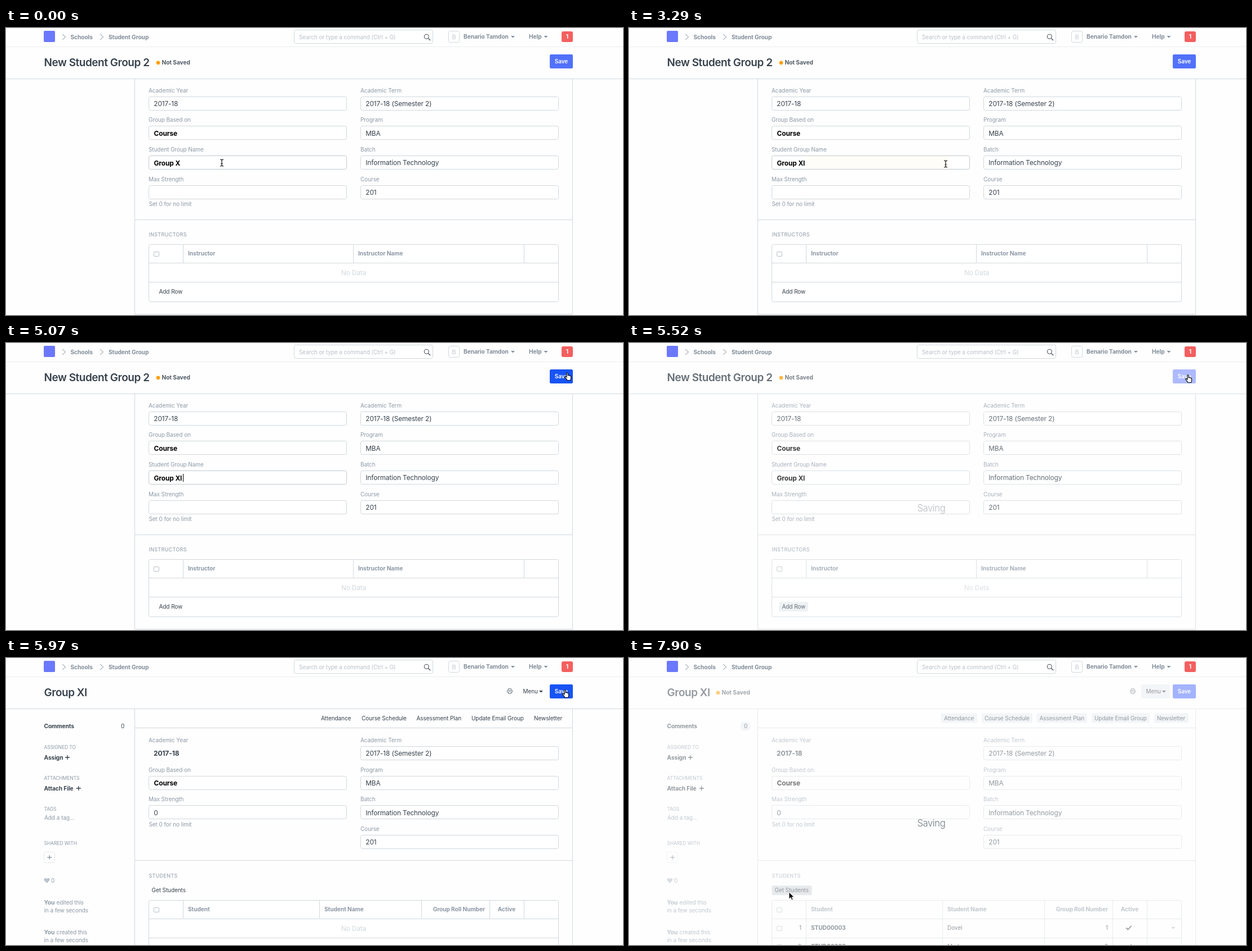
Recreate the animation shown at these times as an HTML page. Size 1095 px wide and 511 px high, loop 8000 ms.

```html
<!DOCTYPE html>
<html lang="en">
<head>
<meta charset="utf-8">
<title>Student group form</title>
<style>
  html, body { margin: 0; width: 100%; height: 100%; overflow: hidden; background: #fefefe; }
  svg { display: block; font-family: Inter, Roboto, sans-serif; }
  text { white-space: pre; }
</style>
</head>
<body>
<svg id="stage" width="1095" height="511" viewBox="0 0 1095 511"></svg>
<script>
const LOOP = 8000;
const INK = '#36414c', GRAY = '#8d99a6', LINE = '#d1d8dd', PALE = '#d1d8dd', SOFT = '#e9eef2';
const NAV = '#828e9a', BLUE = '#5271fb', HOVER = '#1854f5';

// y is the middle of the capital letters
function text(x, y, s, { size = 10, fill = GRAY, w = 400, a = 'start', ls = -.008 } = {}) {
  return `<text x="${x}" y="${y + size * .363}" font-size="${size}" font-weight="${w}" fill="${fill}"
    text-anchor="${a}" letter-spacing="${ls * size}">${s}</text>`;
}
const bold = (x, y, s, fill = GRAY, a) => text(x, y, s, { size: 10.2, w: 700, fill, a });
const rect = (x, y, w, h, fill, r = 0, stroke = 'none') =>
  `<rect x="${x}" y="${y}" width="${w}" height="${h}" rx="${r}" fill="${fill}" stroke="${stroke}"/>`;
const path = (d, stroke = LINE, fill = 'none', width = 1) =>
  `<path d="${d}" stroke="${stroke}" fill="${fill}" stroke-width="${width}"/>`;
const triangle = (x, y, fill) => path(`M${x - 3.5} ${y - 1.5}h7l-3.5 3.5z`, 'none', fill);
const plus = (x, y, color) => path(`M${x - 4} ${y}h8M${x} ${y - 4}v8`, color, 'none', 1.3);
const dot = (x, y) => `<circle cx="${x}" cy="${y}" r="3.4" fill="#ffa00a"/>`;
const checkbox = (x, y) => rect(x - 4.5, y - 4, 9, 8, '#fff', 1.5, '#b9c0c6');
const button = ([left, right], y, s, bg) =>
  (bg ? rect(left - 5, y - 8.5, right - left + 10, 17, bg, 2) : '') + text(left, y, s, { fill: INK });

const strongValue = (x, y, s, fill) => text(x, y, s, { size: 11.9, w: 700, fill });

function field(x, y, label, value, strong, border = LINE) {
  return text(x, y, label) + rect(x + .5, Math.floor(y + 11) + .5, 351, 24, '#fff', 3, border) +
    (strong ? strongValue(x + 9.5, y + 23.8, value, '#000')
      : text(x + 9.3, y + 23.8, value, { size: 11.8, fill: INK }));
}

function table(y, height, cols, columnBottom) {
  return rect(253.5, y, 727, height, '#fff', 3, LINE) +
    path(`M254 ${y + 33}H980M254 ${y + 67}H980` + cols.map(x => `M${x} ${y}V${columnBottom}`).join('')) +
    checkbox(267, y + 17);
}
const noData = y => text(617, y, 'No Data', { size: 11.7, fill: PALE, a: 'middle' });

function navbar() {
  const chevron = x => path(`M${x} 11l5.5 5l-5.5 5`, '#b4bcc4', 'none', 1.3);
  return rect(67, 5, 20, 20, '#6c78fb', 2) + chevron(100) + chevron(167) +
    bold(114.5, 16, 'Schools', NAV) + bold(182, 16, 'Student Group', NAV) +
    rect(511.5, 3.5, 246, 24, '#fff', 3, LINE) +
    text(520, 16, 'Search or type a command (Ctrl + G)', { fill: '#b8c0c8' }) +
    `<circle cx="746.3" cy="15.3" r="4" fill="none" stroke="#4c565f" stroke-width="1.1"/>` +
    path('M749.3 18.3L753 22', '#4c565f', 'none', 1.4) +
    rect(785.5, 5.5, 19, 20, '#fff', 3, LINE) +
    text(795, 15.7, 'B', { size: 11, fill: '#c3cad1', a: 'middle' }) +
    bold(812, 15.5, 'Benario Tamdon', NAV) + triangle(899.5, 15.5, NAV) +
    bold(928, 15.5, 'Help', NAV) + triangle(958, 15.5, NAV) +
    rect(986, 6, 20, 19, '#f45f5f', 3) + bold(996, 15.7, '1', '#fff', 'middle') +
    path('M0 33.5H1095', '#eaedf0') + path('M0 90.5H1095', LINE);
}

const heading = s => text(67.5, 61.5, s, { size: 18.9, w: 600, fill: INK, ls: -.022 });
const notSaved = x => dot(x, 61.8) + bold(x + 6.5, 61.5, 'Not Saved', '#525c66');
const saveButton = bg => rect(965, 47, 41, 25, bg, 2.5) +
  text(985.5, 59, 'Save', { w: 600, fill: '#fff', a: 'middle' });
const section = (y, s) => text(253.5, y, s, { size: 9, ls: .035 });

function newForm(t, fading) {
  const name = t < 2850 ? 'Group X' : 'Group XI';
  const over = t >= 4330;
  return heading('New Student Group 2') + notSaved(270) +
    saveButton(fading ? '#93a5ff' : over ? HOVER : BLUE) +
    path('M228.5 91V509.5H1005.5V91M228.5 341.5H1005.5') +
    field(253, 111, 'Academic Year', '2017-18') +
    field(253, 163.7, 'Group Based on', 'Course', true) +
    field(253, 216.4, 'Student Group Name', name, true, fading ? LINE : '#c3c9ce') +
    (t >= 3290 && t < 3740 ? rect(315, 228, 252, 23, '#fffdf7') : '') +
    field(253, 269, 'Max Strength', '') + text(253.5, 313.5, 'Set 0 for no limit') +
    field(629, 111, 'Academic Term', '2017-18 (Semester 2)') +
    field(629, 163.7, 'Program', 'MBA') +
    field(629, 216.4, 'Batch', 'Information Technology') +
    field(629, 269, 'Course', '201') +
    section(368, 'INSTRUCTORS') + table(385.5, 102, [314.5, 616.5, 919.5], 418.5) +
    bold(323, 401.5, 'Instructor') + bold(625, 401.5, 'Instructor Name') +
    noData(435.5) + button([271.5, 313], 469.5, 'Add Row', fading && SOFT) + caret(t);
}

// [start, end, x] of each time the text caret is lit
const carets = [[450, 900, 309], [1500, 1950, 309], [1950, 2400, 313], [2400, 2550, 309],
  [2850, 3290, 314], [3740, 4180, 314], [4625, 5220, 314]];
function caret(t) {
  const lit = carets.find(([from, to]) => t >= from && t < to);
  return lit ? path(`M${lit[2] + .5} 233V247`, '#000') : '';
}

function sidebar(fading) {
  const cap = (y, s) => text(67.5, y, s, { size: 8.5 });
  const log = (y, verb) => bold(67.5, y, 'You') + text(89.5, y, verb + ' this') + text(67.5, y + 14, 'in a few seconds');
  return bold(67.5, 121.5, 'Comments', INK) +
    (fading ? rect(197.5, 113, 18, 17, SOFT, 8) : '') + text(207, 121.7, '0', { fill: INK, a: 'middle' }) +
    cap(158.5, 'ASSIGNED TO') + bold(67.5, 177, 'Assign', INK) + plus(109, 177, INK) +
    cap(213.5, 'ATTACHMENTS') + bold(67.5, 232, 'Attach File', INK) + plus(128.8, 232, INK) +
    cap(268.7, 'TAGS') + text(68, 284, 'Add a tag...') +
    cap(329.5, 'SHARED WITH') +
    `<rect x="67.5" y="345.5" width="19" height="19" rx="2" fill="none" stroke="${PALE}" stroke-dasharray="2 2"/>` +
    plus(77.3, 355, GRAY) +
    path('M72.5 401L68.3 396.5Q66.5 393.5 69 392Q71.2 391.2 72.5 393.6Q73.8 391.2 76 392Q78.5 393.5 76.7 396.5Z', 'none', '#b8c2cc') +
    text(80, 396.5, '0') + log(435.3, 'edited') + log(488, 'created');
}

function student(y, n, id, name) {
  return checkbox(267, y + 1) + text(306, y, n, { fill: INK, a: 'end' }) + bold(323, y, id, INK) +
    text(565, y, name, { fill: INK }) + text(850, y, n, { fill: INK, a: 'end' }) +
    path(`M882.5 ${y}l3 3l6 -6.5`, INK, 'none', 1.8) + triangle(966, y, '#b4bcc4');
}

function savedForm(t, fading) {
  const filled = t >= 7750;
  const bg = fading && SOFT;
  const getBg = t >= 7460 ? '#d3d9df' : t >= 7310 ? '#e2e7ec' : '';
  const tabs = [[559, 613, 'Attendance'], [631, 711, 'Course Schedule'], [728.5, 808, 'Assessment Plan'],
    [826, 919, 'Update Email Group'], [937, 988, 'Newsletter']];
  return heading('Group XI') + (filled ? notSaved(158) : '') +
    path('M891.5 57.5V54.5H896.5V57.5M891.5 61H889.5V57.5H898.5V61H896.5M891.5 60H896.5V63.5H891.5Z', '#77828c', '#fff') +
    (bg ? rect(909, 47, 51, 25, bg, 2.5) : '') +
    text(917.5, 59, 'Menu', { fill: INK }) + triangle(949.5, 59.5, INK) +
    saveButton(t < 6120 ? HOVER : BLUE) + sidebar(fading) +
    path('M228.5 91V511M1005.5 91V511M228.5 124.5H1005.5M228.5 360.5H1005.5') +
    tabs.map(([left, right, s]) => button([left, right], 107, s, bg)).join('') +
    text(253, 146.3, 'Academic Year') + strongValue(262, 169.5, '2017-18', INK) +
    field(253, 199, 'Group Based on', 'Course', true) +
    field(253, 251.7, 'Max Strength', '0') + text(253.5, 296.3, 'Set 0 for no limit') +
    field(629, 146.3, 'Academic Term', '2017-18 (Semester 2)') +
    field(629, 199, 'Program', 'MBA') +
    field(629, 251.7, 'Batch', 'Information Technology') +
    field(629, 304.3, 'Course', '201') +
    section(387.7, 'STUDENTS') + button([258.5, 319.5], 413.7, 'Get Students', getBg) +
    table(431.5, 110, [314.5, 556.5, 737.5, 858.5, 919.5], filled ? 520 : 464.5) +
    bold(323, 447.5, 'Student') + bold(565, 447.5, 'Student Name') +
    bold(850, 447.5, 'Group Roll Number', GRAY, 'end') + bold(888.5, 447.5, 'Active', GRAY, 'middle') +
    (filled ? student(480.5, 1, 'STUD00003', 'Dovel') + student(513.5, 2, 'STUD00008', 'Marlo') : noData(481.5));
}

// Pointer stops: time, shape, place
const stops = [
  [0, 'beam', 383, 240], [3290, 'beam', 562, 242], [3440, 'arrow', 643, 271],
  [3740, 'beam', 720, 302], [3890, 'beam', 806, 240], [4035, 'arrow', 880, 152],
  [4180, 'arrow', 938, 96], [4330, 'hand', 972, 60], [4475, 'hand', 996, 56],
  [4625, 'hand', 994, 54], [4770, 'hand', 991, 52], [5370, 'hand', 988, 55], [5520, 'hand', 987, 56],
  [6120, 'arrow', 940, 118], [6270, 'arrow', 762, 288], [6420, 'arrow', 520, 420],
  [6570, 'arrow', 330, 484], [6720, 'arrow', 226, 466], [6860, 'arrow', 283, 426],
  [7310, 'hand', 280, 417], [7750, 'arrow', 284, 417]];
const shapes = {
  beam: path('M-3 -6q2 0 3 1q1 -1 3 -1M-3 6q2 0 3 -1q1 1 3 1M0 -5V5M-1.5 1.5h3', '#000', 'none', 1.1),
  arrow: path('M0 0V12L3 9.5L5 14L7 13L5 8.8H9Z', '#fff', '#000', .8),
  hand: path('M4 9V2Q4 .7 5.1 .7T6.2 2V5.6Q7 5 8 5.9Q9 5.5 9.8 6.5Q11.6 6.3 11.6 8V10.5Q11.6 12 10.6 14.5H5' +
    'Q4 12.5 2.6 11Q1 9 .7 8Q1.4 6.9 2.6 7.6Z', '#000', '#fff', 1.1)
};
function pointer(t) {
  const [, shape, x, y] = stops.findLast(s => t >= s[0]);
  return `<g transform="translate(${x} ${y})">${shapes[shape]}</g>`;
}

// How far the saving veil has faded in, 0 to 1
function veil(t) {
  if (t >= 7900 || (t >= 5670 && t < 5970)) return 1;
  if (t >= 7750 || (t >= 5520 && t < 5670)) return .5;
  return 0;
}

function scene(t) {
  const fade = veil(t);
  const form = t < 5970 ? newForm : savedForm;
  const cover = fade ? `<g opacity="${fade * .47}">${rect(0, 34, 1095, 477, '#fcfcfd')}</g><g opacity="${fade}">` +
    text(511.5, 293.5, 'Saving', { size: 16.8, w: 300, fill: '#737a81', ls: -.03 }) + '</g>' : '';
  return navbar() + form(t, fade > 0) + cover + pointer(t);
}

const stage = document.getElementById('stage');
const start = performance.now();
let shown = '';
function frame() {
  const next = scene((performance.now() - start) % LOOP);
  if (next !== shown) stage.innerHTML = shown = next;
  requestAnimationFrame(frame);
}
frame();
</script>
</body>
</html>
```
